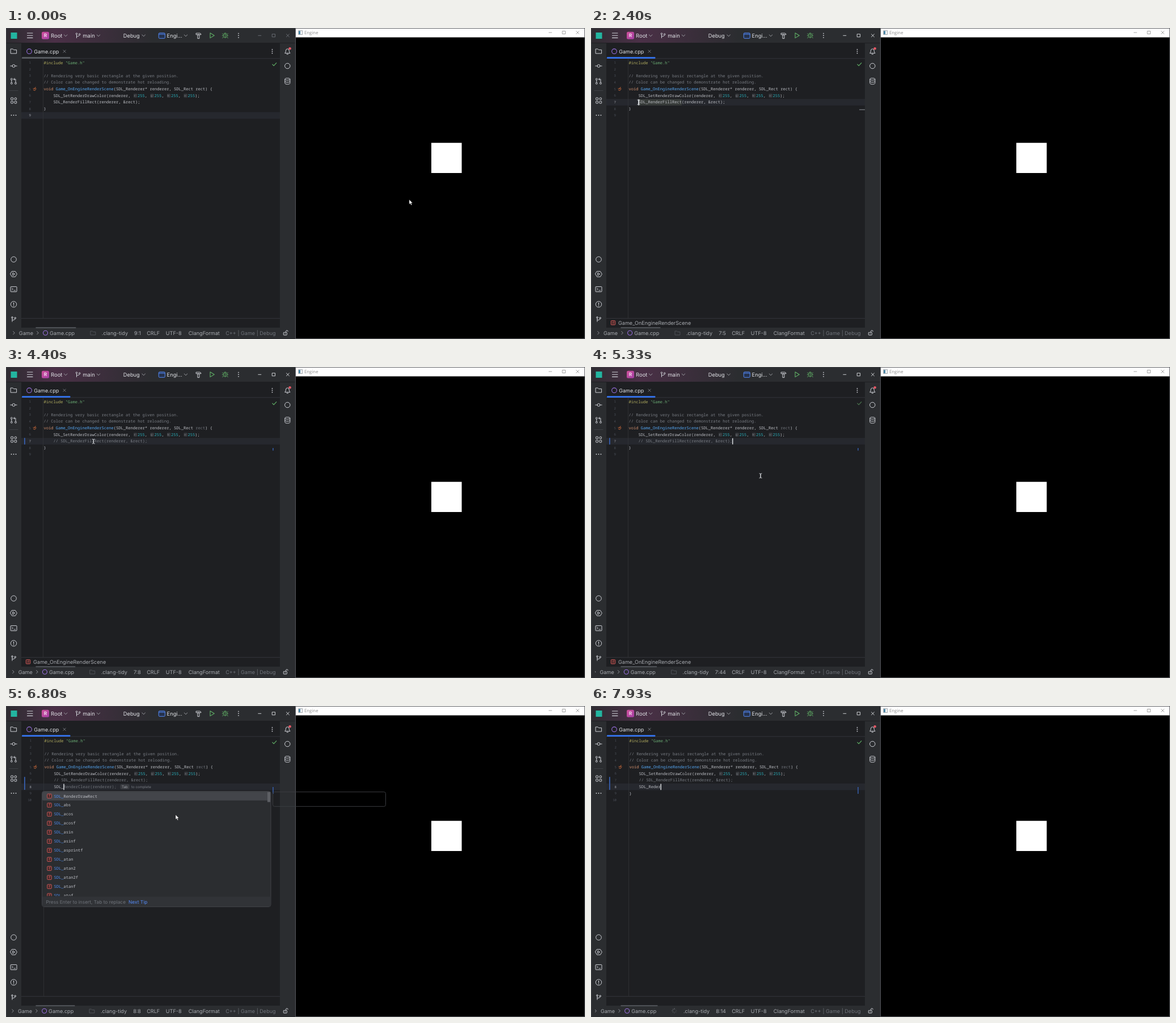
Recreate the animation shown at these times as an HTML page. Size 1021x549 px, loop 8 s.

```html
<!DOCTYPE html>
<html lang="en">
<head>
<meta charset="utf-8">
<title>Hot reload demo</title>
<style>
  html, body { margin: 0; width: 100%; height: 100%; overflow: hidden; background: #000; }
  svg { display: block; width: 1021px; height: 549px; }
  text { white-space: pre; text-rendering: geometricPrecision; font-family: Inter, sans-serif; }
  .mono { font-family: "Noto Sans Mono", monospace; }
  .win { font-family: "Open Sans", sans-serif; }
</style>
</head>
<body>
<svg id="stage" viewBox="0 0 1021 549" xmlns="http://www.w3.org/2000/svg">
  <defs>
    <linearGradient id="bar" gradientUnits="userSpaceOnUse" x1="0" x2="260" y1="0" y2="0">
      <stop offset="0" stop-color="#2e2c31"/>
      <stop offset=".33" stop-color="#4b3047"/>
      <stop offset="1" stop-color="#2b2d30"/>
    </linearGradient>
    <linearGradient id="badge" x1="0" x2="1" y1="0" y2="1">
      <stop offset="0" stop-color="#d0509a"/>
      <stop offset="1" stop-color="#a53fa6"/>
    </linearGradient>
    <clipPath id="list"><rect x="64" y="151" width="403" height="184.5"/></clipPath>
    <clipPath id="crumbs"><rect x="7" y="530" width="150" height="18"/></clipPath>
  </defs>
  <g id="base"></g>
  <g id="live"></g>
  <g id="mouse"></g>
</svg>
<script>
const LOOP = 8000, ADV = 4.25, PITCH = 11.66;
const C = {
  text: '#bcbec4', ui: '#ced0d6', dim: '#6f737a', note: '#7a7e85', key: '#cf8e6d', fn: '#56a8f5',
  num: '#2aacb8', str: '#6aab73', pre: '#b3ae60', blue: '#3574f0', link: '#548af7',
  red: '#db5c5c', green: '#5fad65', panel: '#2b2d30', edge: '#43454a', violet: '#9a70e0'
};
const $ = id => document.getElementById(id);

// Drawing helpers, all returning markup
const esc = s => s.replace(/&/g, '&amp;').replace(/</g, '&lt;');
const text = (x, y, s, fill = C.text, size = 9.1, extra = '') =>
  `<text x="${x}" y="${y}" fill="${fill}" font-size="${size}" ${extra}>${esc(s)}</text>`;
const mono = (x, y, s, fill = C.text, size = 7.083, extra = '') =>
  text(x, y, s, fill, size, 'class="mono" ' + extra);
const rect = (x, y, w, h, fill, extra = '') =>
  `<rect x="${x}" y="${y}" width="${w}" height="${h}" fill="${fill}" ${extra}/>`;
const path = (d, stroke = C.ui, w = 1, fill = 'none') =>
  `<path d="${d}" stroke="${stroke}" stroke-width="${w}" fill="${fill}" stroke-linejoin="round" stroke-linecap="round"/>`;
const ring = (x, y, r, stroke = C.ui, w = 1, fill = 'none') =>
  `<circle cx="${x}" cy="${y}" r="${r}" stroke="${stroke}" stroke-width="${w}" fill="${fill}"/>`;
const dot = (x, y, r, fill = C.ui) => ring(x, y, r, 'none', 0, fill);
const down = (x, y) => path(`M${x - 2.8} ${y - 1.2}l2.8 2.7 2.8-2.7`, '#a4a6ac', .9);
const right = (x, y) => path(`M${x - 1.2} ${y - 2.6}l2.6 2.6-2.6 2.6`, '#9da0a8', .9);
const dots = (x, y, dx, dy) => [-1, 0, 1].map(i => dot(x + i * dx, y + i * dy, .9)).join('');
const branch = (x, y) => ring(x - 2.5, y - 3, 1.3) + ring(x + 2.7, y - 2, 1.3) +
  path(`M${x - 2.5} ${y - 1.6}v6M${x + 2.7} ${y - .6}q0 2.2-5.2 2.2`);
const folder = (x, y, c = C.ui, k = 1) =>
  path(`M${x - 5 * k} ${y - 4 * k}h${3.6 * k}l${1.5 * k} ${1.6 * k}h${5 * k}v${6.4 * k}h${-10.1 * k}z`, c);
const buttons = (x, y, gap, c) =>
  path(`M${x - 2.5} ${y}h5M${x + gap - 2.5} ${y - 2.5}h5v5h-5zM${x + 2 * gap - 2.5} ${y - 2.5}l5 5m0-5l-5 5`, c, .9);
const symbol = (x, y, ch) => {
  const c = ch === 'T' ? '#a571e6' : C.red;
  return rect(x - 3.7, y - 3.7, 7.4, 7.4, ch === 'T' ? '#2f2936' : '#402929', `rx="1" stroke="${c}" stroke-width=".9"`) +
    mono(x, y + 2.2, ch, c, 6.2, 'text-anchor="middle"');
};

function drawBase() {
  const sq = (x, y) => rect(x, y, 3.8, 3.8, 'none', `stroke="${C.ui}" rx=".6"`);
  $('base').innerHTML = [
    rect(0, 0, 511, 549, C.panel), rect(27, 27, 456, 502, '#1e1f22'),
    rect(0, 0, 510, 26.5, 'url(#bar)'), rect(0, 26, 510, 1, '#1e1f22'),
    rect(27, 53.5, 456, .8, '#393b40'), rect(27, 512.3, 456, .8, '#393b40'),
    rect(0, 0, .8, 549, '#45474b'), rect(0, 0, 510, .7, '#45474b'),
    // toolbar
    rect(8.5, 8, 11, 11, '#23b5a0'),
    path('M37.5 9h9.5M37.5 13.2h9.5M37.5 17.4h9.5', C.ui, 1.1),
    rect(63, 6.8, 13, 13, 'url(#badge)', 'rx="2.5"'),
    text(69.5, 16.4, 'R', '#fff', 8.4, 'text-anchor="middle" font-weight="500"'),
    text(79, 16.7, 'Root', '#dfe1e5', 9.5), down(105.2, 13.2),
    branch(127, 13.2), text(135.3, 16.7, 'main', '#dfe1e5', 9.5), down(163, 13.2),
    text(206.8, 16.7, 'Debug', '#dfe1e5', 9.3), down(242.7, 13.2),
    rect(269.3, 8.8, 11, 9.5, '#25324d', `rx="1.5" stroke="${C.link}"`), path('M269.5 11h10.6', C.link),
    text(283.6, 16.7, 'Engi...', '#dfe1e5', 9.3), down(317, 13.2),
    path('M335.5 9.2h6.3q2 .3 2.2 2.5h-8.5zM338.3 12h2.6v6.6h-2.6z'),
    path('M360 8.8l7.3 4.4-7.3 4.4z', C.green, 1.1),
    path('M383.7 11.5q2.8-3 5.6 0v3.6q-2.8 4.4-5.6 0zM384.3 10q2.2-3 4.4 0M381.6 10.2l2 1.4M381.3 13.6h2.4M381.6 17.6l2.2-1.6M391.4 10.2l-2 1.4M391.7 13.6h-2.4M391.4 17.6l-2.2-1.6M386.5 11v6', C.green, .9),
    dots(410, 13.2, 0, 3.6),
    // tab
    ring(41, 41.2, 4.3, C.violet, 1.1), text(49.2, 44.5, 'Game.cpp', '#dfe1e5'),
    path('M100.9 39l4.4 4.4m0-4.4l-4.4 4.4', '#868a91', .8), dots(469.5, 41.2, 0, 3.3),
    // left stripe
    folder(13.5, 41), ring(13.5, 67, 2.4), path('M7.8 67h3.1M16.2 67h3'),
    ring(9.8, 90.4, 1.5), ring(9.8, 97.6, 1.5), ring(17, 97.6, 1.5), path('M9.8 92v4M17 96v-5.6h-3.5m1.6-1.7l-1.7 1.7 1.7 1.7'),
    rect(5.5, 110, 16, .8, '#43454a'), sq(8.7, 123), sq(8.7, 129.2), sq(14.9, 129.2), ring(16.8, 124.9, 1.9),
    dots(13.5, 154, 4, 0), ring(13.5, 408.5, 4.8),
    path('M10.6 429.6h5.8l3 4.8-3 4.8h-5.8l-3-4.8z'), path('M12.2 432.2l3.6 2.2-3.6 2.2z'),
    rect(8, 456.6, 11, 9, 'none', `stroke="${C.ui}" rx="1"`), path('M10.3 459l2 2-2 2M13.8 463.2h2.8', C.ui, .9),
    ring(13.5, 487.8, 5.2), path('M13.5 485v3.2', C.ui, 1.2), dot(13.5, 490.5, .8), branch(13.5, 514),
    // right stripe
    path('M492 44.2q1.5-1.5 1.4-4.2 .2-3 2.9-3.2 2.8.2 2.9 3.2 0 2.7 1.5 4.2zM495 46.3h2.6'),
    dot(500.6, 36.3, 2.3, '#e55765'), ring(496.3, 67, 4.7),
    path('M491.8 90.3a4.5 1.8 0 0 1 9 0a4.5 1.8 0 0 1-9 0v7.2q0 1.8 4.5 1.8t4.5-1.8v-7.2M491.8 93.9q0 1.8 4.5 1.8t4.5-1.8'),
    // status bar
    text(248.2, 541.7, 'CRLF', '#a8abb0'), text(281.8, 541.7, 'UTF-8', '#a8abb0'),
    text(321.8, 541.7, 'ClangFormat', '#a8abb0'), text(387.2, 541.7, 'C++ | Game | Debug', C.dim),
    rect(489.3, 537.3, 6, 4.8, 'none', `stroke="${C.ui}" rx=".8"`), path('M493.6 537v-1.4a1.8 1.8 0 0 1 3.6 0'), dot(492.3, 539.7, .7),
    // game window
    rect(510, 0, 511, 549, '#000'), rect(511, .5, 509.5, 16, '#fff'),
    rect(515.7, 4.8, 7, 6.6, '#f4f6f8', 'stroke="#8a9097" stroke-width=".8"'), rect(516.3, 5.3, 2.7, 5.6, '#3f7f9f'),
    rect(750, 202.7, 53.6, 53.3, '#fff')
  ].join('');
}

// Cumulative editor changes
const steps = [
  [0, { row: 9, col: 0, call: '', typed: '' }],
  [400, { engine: 1 }],
  [2130, { engine: 0, ide: 1, row: 7, col: 4, edit: 2130, crumb: 1, mark: 1 }],
  [3490, { call: '/', col: 5, edit: 3490 }],
  [3660, { call: '//', col: 6, edit: 3660, changed: 1, mark: 0 }],
  [3860, { call: '// ', col: 7, edit: 3860 }],
  [4200, { unused: 1 }],
  [4930, { col: 43, edit: 4930, busy: 1 }],
  [5560, { busy: 0 }],
  [5660, { row: 8, col: 4, edit: 5660, split: 1, crumb: 0 }],
  [6200, { typed: 'S' }],
  [6330, { typed: 'SD', list: 1, ghost: 1 }],
  [6530, { typed: 'SDL' }],
  [6730, { typed: 'SDL_', doc: 1 }],
  [6900, { doc: 2 }],
  [7130, { typed: 'SDL_R', list: 2 }],
  [7330, { typed: 'SDL_Re' }],
  [7400, { spin: 1 }],
  [7640, { typed: 'SDL_Red', ghost: 0 }],
  [7730, { typed: 'SDL_Rede', list: 0, doc: 0 }],
  [7800, { typed: 'SDL_Reder' }]
];
function stateAt(t) {
  const s = {};
  for (const [at, change] of steps) if (at <= t) {
    Object.assign(s, change);
    if (change.typed) { s.col = 4 + s.typed.length; s.edit = at; }
  }
  return s;
}

const lists = [, 
  'RenderDrawRect abs acos acosf asin asinf asprintf atan atan2 atan2f atanf atof',
  'RenderDrawRect Rect Renderer ReadU8 RecordGesture RectEmpty RectEquals RegisterApp RegisterEvents RemoveTimer RenderClear RenderCopy'
].map(s => s.split(' '));
const tips = [, ['Press Enter to insert, Tab to replace', 216],
  ['Ctrl+Down and Ctrl+Up will move caret down and up in the editor', 332]];

const rowY = n => 61 + (n - 1) * PITCH;

function editor(s, blink) {
  const x0 = s.split ? 67.5 : 66.5, last = s.split ? 10 : 9;
  const X = col => x0 + col * ADV, y = rowY(s.row);
  const code = (n, col, str, fill, dx = 0) => mono(X(col) + dx, rowY(n) + 2.5, str, fill);
  const out = [rect(27, y - 5.8, 456, 11.7, '#26282e'), rect(x0 - 1.5, 54, .8, 458, '#313438')];
  for (let n = 1; n <= last; n++)
    out.push(mono(x0 - 22.4, rowY(n) + 2.1, '' + n, n === s.row ? '#a1a3ab' : '#4b5059', 5.8, 'text-anchor="end"'));
  out.push(path(`M${x0 - 18.5} 107h2.2m2-2.6l-2 2.6 3 .2M${x0 - 18} 109.5l2.6 .8 1.2-1.6`, '#d9703c', .9));
  if (s.changed) out.push(rect(32, 125.2, 1.8, s.split ? 22.8 : 11.6, '#375fad'),
    rect(470.2, 143, 1.5, s.split ? 12 : 4.5, '#375fad'));
  if (s.mark) out.push(rect(473, 143.6, 10, 1.2, '#7d8087'), rect(X(4 + s.call.length), 125.3, 18 * ADV, 11.4, '#373b39'));
  out.push(
    code(1, 0, '#include', C.pre), code(1, 9, '"Game.h"', C.str),
    code(3, 0, '// Rendering very basic rectangle at the given position.', C.note),
    code(4, 0, '// Color can be changed to demonstrate hot reloading.', C.note),
    code(5, 0, 'void', C.key), code(5, 5, 'Game_OnEngineRenderScene', C.fn),
    code(5, 29, '(SDL_Renderer* renderer, SDL_Rect'), code(5, 63, 'rect', s.unused ? C.dim : C.text), code(5, 67, ') {'),
    code(6, 4, 'SDL_SetRenderDrawColor(renderer,'));
  [...'rgba'].forEach((ch, i) => {
    const col = 37 + 5 * i, dx = 8.25 * (i + 1);
    out.push(rect(X(col) + dx - 7, rowY(6) - 3.3, 6.3, 7, '#34363a', 'rx="1.2"'),
      mono(X(col) + dx - 6.6, rowY(6) + 1.9, ch + ':', '#868a91', 4.8),
      code(6, col, '255', C.num, dx), code(6, col + 3, i < 3 ? ',' : ');', C.text, dx));
  });
  const off = s.call.startsWith('//');
  out.push(code(7, 4, s.call + 'SDL_RenderFillRect(renderer, &rect);', off ? C.note : C.text));
  if (s.typed) out.push(code(8, 4, s.typed));
  if (s.ghost) {
    const full = 'SDL_RenderClear(renderer);';
    out.push(code(8, s.col, full.slice(s.typed.length), C.dim),
      rect(201.5, 138, 16.2, 9, '#393b40', 'rx="2"'), text(204, 144.8, 'Tab', '#a0a3a9', 6.2),
      text(221, 144.8, 'to complete', C.note, 6.24));
  }
  out.push(code(last - 1, 0, '}'));
  if (s.ide && blink) out.push(rect(X(s.col) - .2, y - 5.2, 1.4, 10.8, '#e6e8ec'));
  out.push(path('M469.8 64.2l2.4 2.5 4.6-5', s.busy ? '#4b7550' : C.green, 1.2));
  if (s.crumb) out.push(symbol(39, 520.3, 'f'), text(48, 523.7, 'Game_OnEngineRenderScene', '#a8abb0'));
  return out.join('');
}

function popup(s) {
  if (!s.list) return '';
  const [tip, linkX] = tips[s.list];
  const rows = lists[s.list].map((name, i) => {
    const y = 159 + i * 15.97, n = s.typed.length, full = 'SDL_' + name;
    const kind = name === 'Rect' || name === 'Renderer' ? 'T' : 'f';
    const inline = /^Rect[A-Z]/.test(name) ? path(`M74 ${y}l2 2.5-2 2.5-2-2.5z`, '#dfe1e5', .8, C.panel) : '';
    return symbol(76.5, y, kind) + inline + mono(84.5, y + 2.5, full.slice(0, n), '#4b8bf0') +
      mono(84.5 + n * ADV, y + 2.5, full.slice(n));
  }).join('');
  let out = rect(63.5, 150.5, 403.5, 204, C.panel, `rx="4" stroke="${C.edge}" stroke-width=".9"`) +
    rect(64, 151.2, 402.5, 15.6, '#43454a', 'rx="2"') + `<g clip-path="url(#list)">${rows}</g>` +
    rect(461, 152, 5, 17.5, '#5d5f64') + path('M64 354v-17.5h402.5v17.5', 'none', 0, '#313337') +
    text(70.5, 349.2, tip, C.dim, 8.35) + text(linkX, 349.2, 'Next Tip', C.link, 8.35);
  if (s.doc === 1) out += rect(470.5, 151.7, 199, 25.6, 'none', 'rx="3" stroke="#3a3c40"');
  if (s.doc === 2) out += rect(470.5, 151.7, 199, 24.8, C.panel, `rx="3" stroke="${C.edge}"`) +
    `<text x="475" y="160.6" font-size="7.15" fill="${C.text}">• (SDL_Renderer* renderer, ` +
    `<tspan fill="${C.key}">const</tspan> SDL_Rect* rect) -&gt; <tspan fill="${C.key}">int</tspan></text>` +
    text(482, 170.1, 'Draw a rectangle on the current rendering target.', C.text, 7.15);
  return out;
}

const pen = document.createElement('canvas').getContext('2d');
pen.font = '91px Inter, sans-serif';
const widthOf = s => pen.measureText(s).width / 10;

function status(s, late, turn) {
  const pos = `${late.row}:${late.col + 1}`, end = 238 - widthOf(pos) - 11;
  const left = end - widthOf('.clang-tidy'), dx = left - 168;
  let spin = '';
  for (let i = 0; i < 8; i++) {
    const a = i * Math.PI / 4, c = Math.cos(a), k = Math.sin(a);
    spin += `<path d="M${left - 16 + 2.3 * c} ${538 + 2.3 * k}l${2.2 * c} ${2.2 * k}" stroke="#868a91" opacity="${.2 + ((i - turn + 8) % 8) / 10}"/>`;
  }
  return rect(52.5, 528, 70 + dx, 2.2, '#4d5055') +
    `<g clip-path="url(#crumbs)"><g transform="translate(${dx} 0)">` + right(13, 538.2) +
    text(22, 541.7, 'Game', '#a8abb0') + right(55, 538.2) + ring(68.7, 538.2, 4, C.violet, 1.1) +
    text(76.2, 541.7, 'Game.cpp', '#a8abb0') + '</g></g>' +
    (s.spin ? spin : folder(left - 15.3, 538.5, '#4f5257', .85)) +
    text(left, 541.7, '.clang-tidy', '#a8abb0') + text(238, 541.7, pos, '#a8abb0', 9.1, 'text-anchor="end"');
}

const frame = s => rect(28, 51.3, 85.5, 2.7, s.ide ? C.blue : '#5a5d63', 'rx="1"') +
  buttons(447.3, 13.3, 24.8, s.ide ? '#dfe1e5' : '#6f737a') +
  text(526, 11.1, 'Engine', s.engine ? '#000' : '#8c8c8c', 7.8, 'class="win"') +
  buttons(959.8, 8, 24.1, s.engine ? '#000' : '#9a9a9a') +
  rect(510.5, .5, 510, 548, 'none', `stroke="${s.engine ? '#77735e' : '#5f6166'}" stroke-width=".9"`);

// Mouse: time, x, y
const track = [[0, 711, 303], [420, 711, 303], [1160, 223, 170], [1400, 223, 170], [2000, 84, 131],
  [4150, 84, 131], [4780, 285, 132], [4950, 285, 132], [5260, 299, 192], [LOOP, 299, 192]];
function mouse(t, s) {
  if ((t >= 3490 && t < 4150) || (t >= 5660 && !s.list)) return '';
  const i = track.findIndex(p => p[0] > t), [t0, ax, ay] = track[i - 1], [t1, bx, by] = track[i];
  const u = (t - t0) / (t1 - t0), e = u * u * (3 - 2 * u);
  const x = ax + (bx - ax) * e, y = ay + (by - ay) * e;
  const beam = !s.list && x > 27 && x < 483 && y > 54;
  return beam
    ? path(`M${x - 2} ${y - 4}q2 0 2 1v6q0 1-2 1M${x + 2} ${y - 4}q-2 0-2 1v6q0 1 2 1`, '#e4e6ea', .9)
    : path(`M${x} ${y}v8.2l1.9-1.7 1.5 3.2 1.4-.7-1.4-3h2.5z`, '#222', .5, '#fff');
}

let shown = '';
function render(now) {
  const t = now % LOOP, s = stateAt(t), late = stateAt(Math.max(0, t - 100));
  const blink = s.ide && (t - s.edit) % 1000 < 500;
  const turn = Math.floor(t / 100) % 8;
  const key = JSON.stringify([s, late, blink, s.spin && turn]);
  if (key !== shown) {
    shown = key;
    $('live').innerHTML = editor(s, blink) + status(s, late, turn) + frame(s) + popup(s);
  }
  $('mouse').innerHTML = mouse(t, s);
}

drawBase();
const start = performance.now();
function tick() {
  render(performance.now() - start);
  requestAnimationFrame(tick);
}
tick();
</script>
</body>
</html>
```
